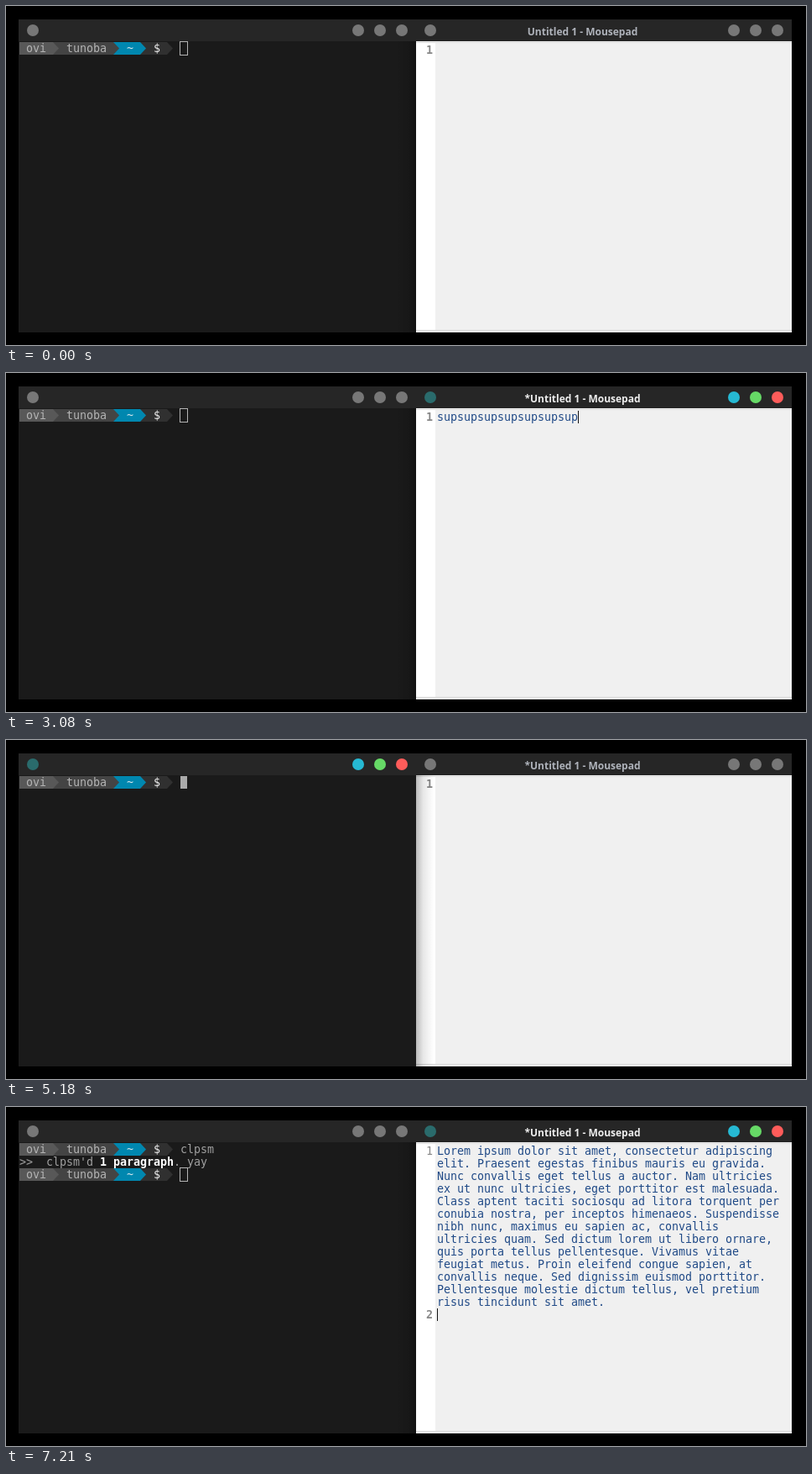
An HTML page with a canvas that plays this animation: 954 px wide and 404 px high, repeating every 8 s.

```html
<!DOCTYPE html>
<html lang="en">
<head>
<meta charset="utf-8">
<title>Clipboard demo</title>
<style>
html, body { margin: 0; width: 100%; height: 100%; overflow: hidden; background: #000; }
canvas { display: block; }
</style>
</head>
<body>
<canvas id="stage" width="954" height="404"></canvas>
<script>
const ctx = document.getElementById('stage').getContext('2d');
const LOOP = 8000, CELL = 8, LINE = 15;
const MONO = '13.33px "DejaVu Sans Mono", monospace';
const TITLE = 'bold 12px "Open Sans", sans-serif';
const LOREM = [
  'Lorem ipsum dolor sit amet, consectetur adipiscing',
  'elit. Praesent egestas finibus mauris eu gravida.',
  'Nunc convallis eget tellus a auctor. Nam ultricies',
  'ex ut nunc ultricies, eget porttitor est malesuada.',
  'Class aptent taciti sociosqu ad litora torquent per',
  'conubia nostra, per inceptos himenaeos. Suspendisse',
  'nibh nunc, maximus eu sapien ac, convallis',
  'ultricies quam. Sed dictum lorem ut libero ornare,',
  'quis porta tellus pellentesque. Vivamus vitae',
  'feugiat metus. Proin eleifend congue sapien, at',
  'convallis neque. Sed dignissim euismod porttitor.',
  'Pellentesque molestie dictum tellus, vel pretium',
  'risus tincidunt sit amet.'
];
const TYPE_SUP = [980, 1050, 1190];
const PASTE_SUP = [2450, 2590, 2730, 2800, 2940, 3080];
const TYPE_COMMAND = [5460, 5530, 5600, 5810, 5880];

const passed = (times, t) => times.filter(time => time <= t).length;
const between = (t, from, to) => t >= from && t < to;

function box(x, y, w, h, color) {
  ctx.fillStyle = color;
  ctx.fillRect(x, y, w, h);
}

function disc(x, y, r, color) {
  ctx.fillStyle = color;
  ctx.beginPath();
  ctx.arc(x, y, r, 0, Math.PI * 2);
  ctx.fill();
}

function shade(x, y, w, h, x0, x1, alpha) {
  const fade = ctx.createLinearGradient(x0, 0, x1, 0);
  fade.addColorStop(0, `rgba(0,0,0,${alpha})`);
  fade.addColorStop(0.4, `rgba(0,0,0,${alpha * 0.35})`);
  fade.addColorStop(1, 'rgba(0,0,0,0)');
  box(x, y, w, h, fade);
}

// Every glyph sits on the whole-pixel character grid.
function mono(text, x, y, color, bold) {
  ctx.font = (bold ? 'bold ' : '') + MONO;
  ctx.fillStyle = color;
  ctx.textAlign = 'left';
  [...text].forEach((glyph, i) => ctx.fillText(glyph, x + i * CELL, y));
}

function label(text, x, y, color) {
  ctx.font = TITLE;
  ctx.fillStyle = color;
  ctx.textAlign = 'center';
  ctx.fillText(text, x, y);
}

function buttons(left, right, active) {
  const colors = active ? ['#2a6b6c', '#26b9d3', '#66d966', '#fe5c5a'] : Array(4).fill('#777');
  [left, right - 52, right - 26, right].forEach((x, i) => disc(x, 29, 7, colors[i]));
}

function prompt(y) {
  const segments = [
    [160, 192, '#303030', '$', 176, '#eee'],
    [128, 160, '#0087af', '~', 144, '#d5e6ec'],
    [56, 128, '#444', 'tunoba', 72, '#b4b4b4'],
    [16, 56, '#585858', 'ovi', 24, '#b4b4b4']
  ];
  for (const [x0, x1, color, text, textX, ink] of segments) {
    ctx.fillStyle = color;
    ctx.beginPath();
    ctx.moveTo(x0, y);
    ctx.lineTo(x1, y);
    ctx.lineTo(x1 + 7, y + LINE / 2);
    ctx.lineTo(x1, y + LINE);
    ctx.lineTo(x0, y + LINE);
    ctx.fill();
    mono(text, textX, y + 12, ink);
  }
}

function terminalBody(t, active) {
  box(15, 42, 474, 347, '#1a1a1a');
  prompt(43);
  const typed = 'clpsm'.slice(0, passed(TYPE_COMMAND, t));
  mono(typed, 208, 55, '#a0a0a0');
  let x = 208 + typed.length * CELL, y = 43;
  if (t >= 6090) {
    mono(">>  clpsm'd", 16, 70, '#a0a0a0');
    mono('1 paragraph', 112, 70, '#fff', true);
    mono('. yay', 200, 70, '#a0a0a0');
    prompt(73);
    x = 208;
    y = 73;
  } else if (t >= 6020) {
    x = 16;
    y = 58;
  }
  if (active) {
    box(x, y, CELL, LINE, '#aaa');
  } else {
    ctx.strokeStyle = '#b4b4b4';
    ctx.lineWidth = 1;
    ctx.strokeRect(x - 0.5, y - 0.5, 9, 16);
  }
}

function editorLines(t) {
  if (t >= 7210) return [...LOREM, ''];
  if (t >= 3990) return [''];
  if (t >= 2100) return ['sup'.repeat(1 + passed(PASTE_SUP, t))];
  return ['sup'.slice(0, passed(TYPE_SUP, t))];
}

function editor(t, active) {
  box(489, 42, 448, 347, '#f5f5f5');
  box(489, 44, 448, 342, '#f0f0f0');
  box(489, 44, 23, 342, '#fff');
  box(489, 43, 448, 1, '#dcdcdc');
  box(489, 386, 448, 1, '#dadada');
  const lines = editorLines(t);
  const last = lines.length - 1;
  const selected = between(t, 1470, 2100) || between(t, 3570, 3990);
  if (selected) box(514, 45, lines[0].length * CELL, LINE, '#b7babb');
  lines.forEach((line, i) => mono(line, 514, 57 + i * LINE, selected ? '#2e3436' : '#204a87'));
  mono('1', 501, 57, '#888', last === 0);
  if (last) mono('2', 501, 57 + last * LINE, '#888', true);
  if (active && !selected) {
    box(514 + lines[last].length * CELL, 45 + last * LINE, 1, LINE, '#111');
  }
}

function editorIcon(x, y) {
  ctx.save();
  ctx.translate(x, y);
  ctx.rotate(-0.24);
  box(-17, -20, 28, 36, '#f6c935');
  ctx.rotate(0.12);
  box(-13, -18, 32, 38, '#f7f8f9');
  for (let i = 0; i < 13; i++) {
    if (i % 5 !== 4) box(-9, -14 + i * 2.3, i % 5 === 3 ? 18 : 24, 1, '#69737c');
  }
  ctx.restore();
}

function terminalIcon(x, y) {
  const metal = ctx.createLinearGradient(0, y - 18, 0, y + 19);
  metal.addColorStop(0, '#34383c');
  metal.addColorStop(0.25, '#292d30');
  metal.addColorStop(1, '#404347');
  ctx.fillStyle = metal;
  ctx.beginPath();
  ctx.roundRect(x - 24, y - 18, 48, 37, 3);
  ctx.fill();
  for (const dx of [11, 15, 19]) disc(x + dx, y - 14, 2, '#fff');
  ctx.strokeStyle = '#fff';
  ctx.lineWidth = 1.5;
  ctx.beginPath();
  ctx.moveTo(x - 18, y - 12);
  ctx.lineTo(x - 14, y - 8);
  ctx.lineTo(x - 18, y - 4);
  ctx.moveTo(x - 13, y - 3);
  ctx.lineTo(x - 5, y - 3);
  ctx.stroke();
}

const apps = {
  Peek(x, mid) {
    const top = mid - 68;
    box(x, top, 288, 135, '#808080');
    box(x, top, 288, 13, '#2f343f');
    box(x + 134, top + 2, 20, 9, '#cc4a4a');
    disc(x + 139, top + 6.5, 2, '#eee');
    box(x + 143, top + 6, 7, 1, '#e0a0a0');
    disc(x + 6, top + 6.5, 2.5, '#c9b8a8');
    disc(x + 282, top + 6.5, 2.5, '#5c6470');
    disc(x + 144, mid + 120, 24, '#f57900');
  },
  Mousepad(x, mid) {
    box(x, mid - 110, 288, 220, '#f0f0f0');
    box(x, mid - 110, 15, 220, '#fff');
    ctx.strokeStyle = '#dcdcdc';
    ctx.lineWidth = 1;
    ctx.strokeRect(x + 0.5, mid - 110.5, 287, 220);
    editorIcon(x + 144, mid + 120);
  },
  Terminal(x, mid, t) {
    ctx.save();
    ctx.translate(x, mid - 105);
    ctx.scale(288 / 474, 288 / 474);
    ctx.translate(-15, -42);
    terminalBody(t, between(t, 5180, 6860));
    ctx.restore();
    terminalIcon(x + 144, mid + 120);
  }
};

function switcher(t, order, selected) {
  box(171, 0, 650, 404, '#f5f7f9');
  order.forEach((name, i) => {
    const x = 192 + (i % 2) * 319;
    const mid = 47 + (i >> 1) * 319;
    if (name === selected) {
      ctx.fillStyle = '#5294e2';
      ctx.strokeStyle = '#2b5f9f';
      ctx.lineWidth = 1;
      ctx.beginPath();
      ctx.roundRect(x - 12.5, mid - 147.5, 313, 312, 2);
      ctx.fill();
      ctx.stroke();
    }
    apps[name](x, mid, t);
    if (name === selected) label(name, x + 144.5, mid + 155, '#fff');
  });
}

function draw(t) {
  const terminalActive = between(t, 5180, 6860);
  const editorActive = between(t, 770, 5180) || t >= 6860;
  box(0, 0, 954, 404, '#000');
  box(15, 16, 922, 26, '#262626');
  terminalBody(t, terminalActive);
  editor(t, editorActive);
  if (terminalActive) shade(489, 42, 23, 347, 489, 510, 0.27);
  else shade(465, 42, 24, 347, 489, 465, 0.3);
  buttons(32, 472, terminalActive);
  buttons(506, 920, editorActive);
  const title = (t >= 980 ? '*' : '') + 'Untitled 1 - Mousepad';
  label(title, 687.5, 35, editorActive ? '#eee' : '#afb3bb');

  if (between(t, 420, 770)) {
    switcher(t, ['Peek', 'Mousepad', 'Terminal'], 'Mousepad');
  } else if (between(t, 4340, 5180)) {
    switcher(t, ['Mousepad', 'Peek', 'Terminal'], t < 5040 ? 'Peek' : 'Terminal');
  } else if (between(t, 6440, 6860)) {
    switcher(t, ['Terminal', 'Mousepad', 'Peek'], 'Mousepad');
  }
}

const start = performance.now();
function frame() {
  draw((performance.now() - start) % LOOP);
  requestAnimationFrame(frame);
}
frame();
</script>
</body>
</html>
```
